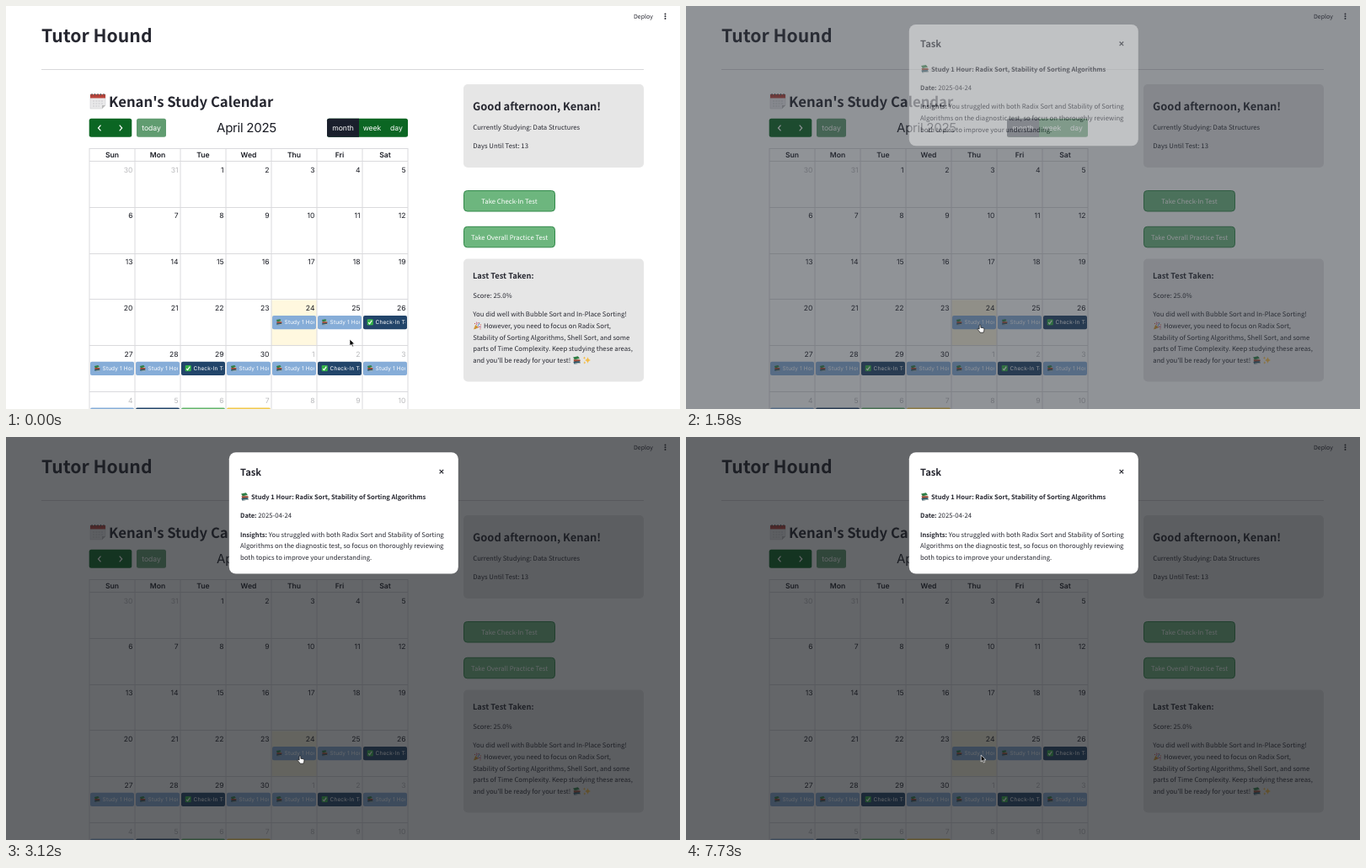
Animation of 800x479 px, one loop 7760 ms. Source, as an HTML page:

```html
<!DOCTYPE html>
<html lang="en">
<head>
<meta charset="utf-8">
<title>Study calendar</title>
<style>
  html, body { margin: 0; width: 100%; height: 100%; overflow: hidden; background: #fff; }
  svg { display: block; width: 800px; height: 479px; }
  text {
    font-family: "Noto Sans CJK JP", "Noto Sans CJK SC", "Noto Sans CJK KR", "Noto Sans CJK TC", "Open Sans", sans-serif;
    font-size: 7.74px; fill: #262730; text-rendering: geometricPrecision; white-space: pre;
  }
  .bold { font-weight: 700; }
  tspan.bold { font-size: 7.55px; }
  .cal { font-family: Inter, "Liberation Sans", sans-serif; font-size: 8.6px; fill: #1a1c24; }
  .cal.bold { font-weight: 600; }
  .mid { text-anchor: middle; }
  .end { text-anchor: end; }
  .white { fill: #fff; }
</style>
</head>
<body>
<svg id="stage" viewBox="0 0 800 479">
  <defs>
    <symbol id="books" viewBox="0 0 10 10">
      <path d="M.6 1.4 6.4.3 8.6 3.200 2.400 4.600Z" fill="#2f7d45"/>
      <path d="M2.400 4.300 8.600 3V4L2.600 5.200Z" fill="#e6e2d6"/>
      <path d="M1 4.200 8.800 4.200 9.300 6.200 2 7.200Z" fill="#9a4a35"/>
      <path d="M.8 6.700 8.400 6.300 9.500 8.500 2 9.700Z" fill="#27566b"/>
      <path d="M2 8.800 9.300 7.700V8.500L2 9.600Z" fill="#d9d4c8"/>
    </symbol>
    <symbol id="check" viewBox="0 0 10 10">
      <rect x=".4" y=".4" width="9.2" height="9.2" rx="1.6" fill="#35b34a"/>
      <path d="M2.4 5.4 4.2 7.5 7.6 2.3" fill="none" stroke="#fff" stroke-width="1.5"/>
    </symbol>
    <symbol id="pad" viewBox="0 0 20 20">
      <path d="M1 2H19V15L15 19H1Z" fill="#e9e9ea" stroke="#c4c4c8" stroke-width=".5"/>
      <path d="M1 2H19V6.5H1Z" fill="#b9433a"/>
      <path d="M3 1V3.6M6.5 1V3.6M10 1V3.6M13.5 1V3.6M17 1V3.6" stroke="#555"/>
      <path d="M4 10H16M4 13H16M4 16H12" stroke="#c9c9cd" stroke-dasharray="2 1.3"/>
      <path d="M15 19V15H19Z" fill="#bbb"/>
    </symbol>
    <symbol id="popper" viewBox="0 0 10 10">
      <path d="M.5 9.6 3 3.8 6.3 7.2Z" fill="#d9a233"/>
      <path d="M1.5 7.3 3 9M2.3 5.5 4.8 8" stroke="#a8622f" stroke-width=".7"/>
      <path d="M4 4Q5 2.5 4 .6M5.8 6.6Q7.5 5.6 9.5 6.7" fill="none" stroke="#b8477c" stroke-width=".9"/>
      <path d="M5 5.5Q7 4.5 7.5 1.5" fill="none" stroke="#4380bd" stroke-width=".9"/>
      <path d="M6 1H7V2H6ZM8.5 3.5H9.5V4.5H8.5ZM1.5 2H2.5V3H1.5ZM8 8.3H9V9.3H8Z" fill="#c94f3a"/>
    </symbol>
    <symbol id="sparkles" viewBox="0 0 10 10">
      <path d="M6 1Q6.5 4.5 9.6 5Q6.5 5.5 6 9Q5.5 5.5 2.4 5Q5.5 4.5 6 1ZM2 .5Q2.3 2 3.6 2.2Q2.3 2.4 2 4Q1.7 2.4 .4 2.2Q1.7 2 2 .5ZM2.3 6.3Q2.5 7.8 3.9 8Q2.5 8.2 2.3 9.7Q2.1 8.2 .8 8Q2.1 7.8 2.3 6.3Z" fill="#f4bb45"/>
    </symbol>
  </defs>
  <g id="page"></g>
  <rect id="tint" width="800" height="479" fill="#97a6c3" fill-opacity=".25"/>
  <rect id="shade" width="800" height="479"/>
  <g id="dialog"></g>
  <g id="pointer" stroke-width=".7" stroke-linejoin="round">
    <path id="arrow" d="M0 0V8L1.9 6.3 3.1 9 4.4 8.4 3.3 5.8H5.8Z" stroke="#fff"/>
    <path id="hand" d="M-.9.9Q-.9-.1 0-.1Q.9-.1.9.9V3.2L4 3.8Q5 4 5 5L4.6 7.6 4 9.2H0L-.6 8-3 5.2Q-3 4-1.9 4.4L-.9 5.2Z" fill="#fff" stroke="#111"/>
  </g>
</svg>
<script>
const $ = id => document.getElementById(id);
const LEFT = 99, COL = 54, TOP = 185, ROW = 54.8;
const STUDENT = "Kenan";

const text = (x, y, str, cls = "", size = 0, extra = "") =>
  `<text x="${x}" y="${y}" class="${cls}" style="${size ? `font-size:${size}px;` : ""}${extra}">${str}</text>`;
const box = (x, y, w, h, fill, r = 0, extra = "") =>
  `<rect x="${x}" y="${y}" width="${w}" height="${h}" rx="${r}" fill="${fill}" ${extra}/>`;
const icon = (name, x, y, size) =>
  `<use href="#${name}" x="${x}" y="${y}" width="${size}" height="${size}"/>`;
const stroke = (d, color, w) => `<path d="${d}" fill="none" stroke="${color}" stroke-width="${w}"/>`;

const eventKinds = {
  s: { fill: "#86add8", icon: "books", label: "Study 1 Hour: Sorting" },
  c: { fill: "#22456a", icon: "check", label: "Check-In Test" },
  g: { fill: "#62b46b" },
  y: { fill: "#f2c84b" }
};
const schedule = ["", "", "", "    ssc", "sscsscs", "scgy"];

function calendarEvent(kind, col, row) {
  const { fill, icon: name, label } = eventKinds[kind];
  const x = LEFT + col * COL, y = TOP + row * ROW + 18.6;
  let out = box(x + 1, y, 52, 16.3, fill, 2);
  if (label) {
    out += icon(name, x + 5.3, y + 4, 7.8) +
      `<clipPath id="clip${row}${col}"><rect x="${x}" y="${y}" width="51" height="16"/></clipPath>` +
      `<g clip-path="url(#clip${row}${col})">${text(x + 15.6, y + 10.3, label, "cal white", 6.5, "letter-spacing:.02em")}</g>`;
  }
  return out;
}

function calendar() {
  const green = "#0b6623", days = ["Sun", "Mon", "Tue", "Wed", "Thu", "Fri", "Sat"];
  let out = icon("pad", 99, 103, 20) +
    text(122, 120, STUDENT + "'s Study Calendar", "bold", 16.7) +
    box(98.7, 133.7, 50.6, 22.1, green, 2.5) +
    stroke("M112.5 141.7 109.5 145 112.5 148.3M134.7 141.7 137.7 145 134.7 148.3", "#fff", 1.2) +
    box(155, 133.7, 35, 22.1, "#609c70", 2.5) +
    text(172.5, 148, "today", "cal mid white") +
    text(285.5, 150.4, "April 2025", "cal mid", 15.1, "letter-spacing:-.02em") +
    box(381, 133.7, 96, 22.1, green, 2.5) +
    `<path d="M419 133.7H383.5Q381 133.7 381 136.2V153.3Q381 155.8 383.5 155.8H419Z" fill="#1a1f2c"/>` +
    text(400, 148, "month", "cal mid white") +
    text(434.5, 148, "week", "cal mid white") +
    text(463.5, 148, "day", "cal mid white") +
    box(LEFT + 4 * COL, TOP + 3 * ROW, COL, ROW, "#fff8df");

  let lines = "M99 169.5H477";
  for (let i = 0; i < 8; i++) lines += `M${LEFT + i * COL} 169V479`;
  for (let i = 0; i < 6; i++) lines += `M99 ${Math.round(TOP + i * ROW) - .5}H477`;
  out += stroke(lines, "#dadadd", 1);

  days.forEach((d, i) => out += text(LEFT + (i + .5) * COL, 180.4, d, "cal mid bold"));
  for (let i = 0; i < 42; i++) {
    const col = i % 7, row = Math.floor(i / 7);
    const date = new Date(2025, 2, 30 + i);
    const fade = date.getMonth() === 3 ? "" : "opacity:.3";
    out += text(LEFT + (col + 1) * COL - 2.5, TOP + row * ROW + 12.6, date.getDate(), "cal end", 0, fade);
  }
  schedule.forEach((week, row) => [...week].forEach((kind, col) => {
    if (kind !== " ") out += calendarEvent(kind, col, row);
  }));
  return out;
}

function sidebar() {
  const button = (y, label) =>
    box(543.5, y, 108, 24.5, "#6db67e", 4, 'stroke="#32894a"') +
    text(597.5, y + 15.2, label, "mid white");
  let out = box(543, 93, 214, 99, "#e6e6e6", 5) +
    text(554, 124, `Good afternoon, ${STUDENT}!`, "bold", 12.9) +
    text(554.3, 146.6, "Currently Studying: Data Structures") +
    text(554.3, 169, "Days Until Test: 13") +
    button(219.5, "Take Check-In Test") +
    button(262.3, "Take Overall Practice Test") +
    box(543, 300.5, 214, 146, "#e6e6e6", 5) +
    text(554, 323.7, "Last Test Taken:", "bold", 9.3) +
    text(554.3, 347, "Score: 25.0%");
  [
    "You did well with Bubble Sort and In-Place Sorting!",
    "However, you need to focus on Radix Sort,",
    "Stability of Sorting Algorithms, Shell Sort, and some",
    "parts of Time Complexity. Keep studying these areas,",
    "and you'll be ready for your test!"
  ].forEach((line, i) => out += text(i === 1 ? 567 : 554.3, 369.2 + i * 13.7, line));
  return out + icon("popper", 554.5, 375, 10) + icon("books", 672.5, 416, 10) + icon("sparkles", 684.5, 416, 10);
}

$("page").innerHTML =
  text(42, 43, "Tutor Hound", "bold", 21.2) +
  text(745, 14.8, "Deploy", "", 7) +
  [9.4, 12.2, 15].map(y => `<circle cx="782.5" cy="${y}" r="1" fill="#262730"/>`).join("") +
  stroke("M42 75.5H757", "#d8d8da", 1) +
  calendar() + sidebar();

$("dialog").innerHTML =
  box(264.8, 18.2, 272, 144.4, "#fff", 8) +
  text(278, 45.6, "Task", "bold", 11.2) +
  stroke("M514.6 38.8 519.2 43.4M519.2 38.8 514.6 43.4", "#262730", 1.2) +
  icon("books", 278.5, 66, 10) +
  text(291, 74, "Study 1 Hour: Radix Sort, Stability of Sorting Algorithms", "bold", 7.55) +
  text(278, 96.2, '<tspan class="bold">Date:</tspan> 2025-04-24') +
  text(278, 118.5, '<tspan class="bold">Insights:</tspan> You struggled with both Radix Sort and Stability of Sorting') +
  text(278, 132.2, "Algorithms on the diagnostic test, so focus on thoroughly reviewing") +
  text(278, 145.9, "both topics to improve your understanding.");

const clamp = v => Math.min(1, Math.max(0, v));
const smooth = v => v * v * (3 - 2 * v);

// y of cubic-bezier(.2, .8, .4, 1) at x
function easeOut(x) {
  let lo = 0, hi = 1;
  for (let i = 0; i < 20; i++) {
    const s = (lo + hi) / 2, r = 1 - s;
    if (.6 * r * r * s + 1.2 * r * s * s + s ** 3 < x) lo = s; else hi = s;
  }
  const r = 1 - hi;
  return 2.4 * r * r * hi + 3 * r * hi * hi + hi ** 3;
}

function draw() {
  const t = performance.now() % 7760;
  const open = t < 1518 ? 0 : easeOut(clamp((t - 1518) / 260));
  $("tint").style.display = t < 1505 ? "none" : "";
  $("shade").setAttribute("opacity", .56 * open);
  // the dialog fades inside a layer that fades too
  $("dialog").setAttribute("opacity", open * open);
  $("dialog").setAttribute("transform", `translate(0 ${10.9 * (1 - open)})`);

  const move = smooth(clamp((t - 300) / 850)), leave = smooth(clamp((t - 7400) / 200));
  const x = 408 - 59 * move + 1.2 * leave, y = 396 - 17 * move - leave;
  const hand = y < 384 && leave === 0;
  $("pointer").setAttribute("transform", `translate(${x} ${y})`);
  $("hand").style.display = hand ? "" : "none";
  $("arrow").style.display = hand ? "none" : "";
  requestAnimationFrame(draw);
}
draw();
</script>
</body>
</html>
```
